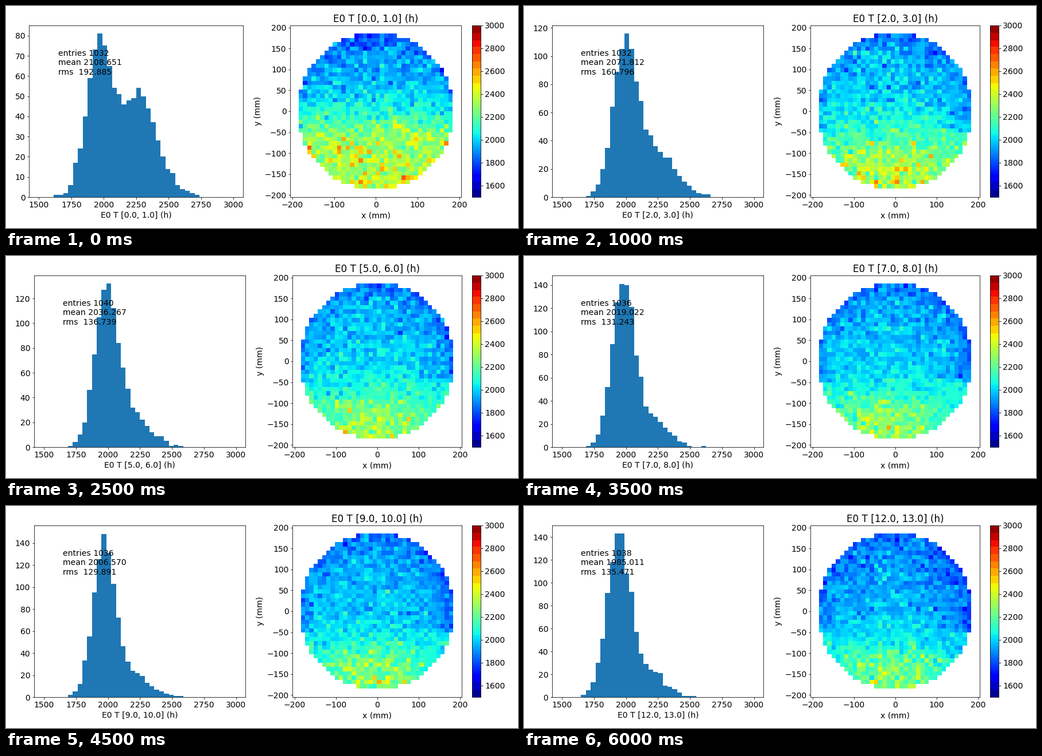
Recreate the animation shown at these times as a matplotlib script. Size 892x388 px, loop 6500 ms.

```python
import numpy as np
import matplotlib.pyplot as plt
from matplotlib.animation import FuncAnimation
from matplotlib.colors import ListedColormap

W, H, DPI = 892, 388, 72
STEPS, INTERVAL = 13, 500
BINS, LOW, HIGH = 40, 1500, 3000
EDGES = np.linspace(LOW, HIGH, BINS + 1)
MIDS = (EDGES[:-1] + EDGES[1:]) / 2
TOP, BOTTOM = 33.9, 334

# Key hours and the statistics measured there
HOURS = [0, 1, 3, 5, 8, 10, 12]
ENTRIES = [1032, 1034, 1031, 1040, 1034, 1038, 1038]
MEANS = [2108.651, 2089.379, 2054.246, 2036.267, 2010.400, 2002.740, 1985.011]
SPREADS = [192.885, 174.016, 147.575, 136.739, 128.495, 131.286, 135.471]
PEAKS = [81, 103, 129, 132, 146, 151, 143]

# Detector disc on a 40 x 40 grid
axis = np.arange(BINS) - BINS / 2 + 0.5
X, Y = np.meshgrid(axis, axis)
DISC = X**2 + Y**2 < 332
U, V = X / 18, Y / 18
RIM = np.hypot(U, V) ** 6 * (V > -0.3)
FIXED = np.random.default_rng(7).normal(size=X.shape)

plt.rcParams["font.family"] = "DejaVu Sans"
plt.rcParams["font.size"] = 14


def gauss(weight, mu, sigma):
    z = (MIDS - mu) / sigma
    return weight * np.exp(-z**2 / 2) / sigma


def histogram(step, mean, rms, peak):
    """A main and a warm population whose mean and rms are given; the warm
    share shrinks with time. Seeded ripple roughens the bars."""
    warm = 0.2 + 0.25 * np.exp(-step / 2)
    gap = 1.6 * rms
    sigma = np.sqrt(rms**2 - warm * (1 - warm) * gap**2)
    main_sigma = 0.88 * sigma
    warm_sigma = np.sqrt((sigma**2 - (1 - warm) * main_sigma**2) / warm)
    shape = (gauss(1 - warm, mean - warm * gap, main_sigma)
             + gauss(warm, mean + (1 - warm) * gap, warm_sigma)
             + gauss(0.02 * np.exp(-step / 2), mean + 450, 120))
    counts = shape / shape.max() * peak
    ripple = np.random.default_rng(40 + step).normal(size=BINS)
    counts = np.clip(counts + 0.45 * np.sqrt(counts) * ripple, 0, None)
    return np.round(counts / counts.max() * peak)


def field(step, counts):
    """Rank the cells by a smooth pattern plus noise, then fill them with
    the values of the histogram."""
    early = (-0.9 * np.tanh(4 * (V + 0.1)) - 0.6 * np.clip(V, 0, 1)
             - 0.5 * RIM)
    glow = np.exp(-0.9 * (U + 0.1) ** 2) / (1 + np.exp(8 * (V + 0.43)))
    late = (1.6 * glow - 0.3 * V - 0.7 * RIM
            - 0.4 * np.clip(U, 0, 1) * (V > -0.2))
    mix = np.exp(-step / 2)
    noise = np.random.default_rng(100 + step).normal(size=X.shape)
    score = mix * early + (1 - mix) * late + 0.2 * FIXED + 0.36 * noise

    rank = score[DISC].argsort().argsort()
    level = (rank + 0.5) / rank.size * counts.sum()
    values = np.full(X.shape, np.nan)
    values[DISC] = np.interp(level, np.r_[0, counts.cumsum()], EDGES)
    return np.ma.masked_invalid(values)


def banded_jet():
    """Jet with coarse bands at both ends."""
    t = np.linspace(0, 1, 256)
    coarse = np.clip((np.floor(t * 24) + 0.5) / 24, 0, 23.5 / 24)
    return ListedColormap(plt.get_cmap("jet")(
        np.where((t > 0.64) | (t < 1 / 12), coarse, t)))


def box(left, right):
    return [left / W, 1 - BOTTOM / H, (right - left) / W, (BOTTOM - TOP) / H]


fig = plt.figure(figsize=(W / DPI, H / DPI), dpi=DPI, facecolor="white")
hist_ax = fig.add_axes(box(49.3, 417.4))
map_ax = fig.add_axes(box(499.4, 794.4))
bar_ax = fig.add_axes(box(812, 827.2))

bars = hist_ax.bar(EDGES[:-1], np.zeros(BINS), width=EDGES[1] - EDGES[0],
                   align="edge", color="#1f77b4")
hist_ax.set_xlim(1425, 3075)
hist_ax.set_xticks(range(LOW, HIGH + 1, 250))
stats = hist_ax.text(1650, 0, "")

image = map_ax.imshow(np.zeros(X.shape), cmap=banded_jet(),
                      vmin=LOW, vmax=HIGH, origin="lower", aspect="auto",
                      interpolation="nearest", extent=(-205, 205, -205, 205))
map_ax.set_xticks(range(-200, 201, 100))
map_ax.set_yticks(range(-200, 201, 50))
map_ax.set_xlabel("x (mm)")
map_ax.set_ylabel("y (mm)")
fig.colorbar(image, cax=bar_ax, ticks=range(1600, HIGH + 1, 200))


def draw(step):
    entries, mean, rms, peak = (np.interp(step, HOURS, key) for key in
                                (ENTRIES, MEANS, SPREADS, PEAKS))
    counts = histogram(step, mean, rms, peak)
    for bar, height in zip(bars, counts):
        bar.set_height(height)

    hist_ax.set_ylim(0, 1.05 * peak)
    hist_ax.set_yticks(np.arange(0, 1.05 * peak, 10 if peak < 90 else 20))
    stats.set_text(f"entries {entries:.0f}\nmean {mean:.3f}\nrms  {rms:.3f}")
    stats.set_y(0.75 * peak)

    label = f"E0 T [{step:.1f}, {step + 1:.1f}] (h)"
    hist_ax.set_xlabel(label)
    map_ax.set_title(label)
    image.set_data(field(step, counts))

    # Two-digit tick labels leave more room for the charts
    narrow = peak < 100
    hist_ax.set_position(box(40.4, 413.4) if narrow else box(49.3, 417.4))
    map_ax.set_position(box(495.4, 793.4) if narrow else box(499.4, 794.4))
    return []


anim = FuncAnimation(fig, draw, frames=STEPS, interval=INTERVAL,
                     init_func=lambda: draw(0), repeat=True, repeat_delay=0)
plt.show()
```
